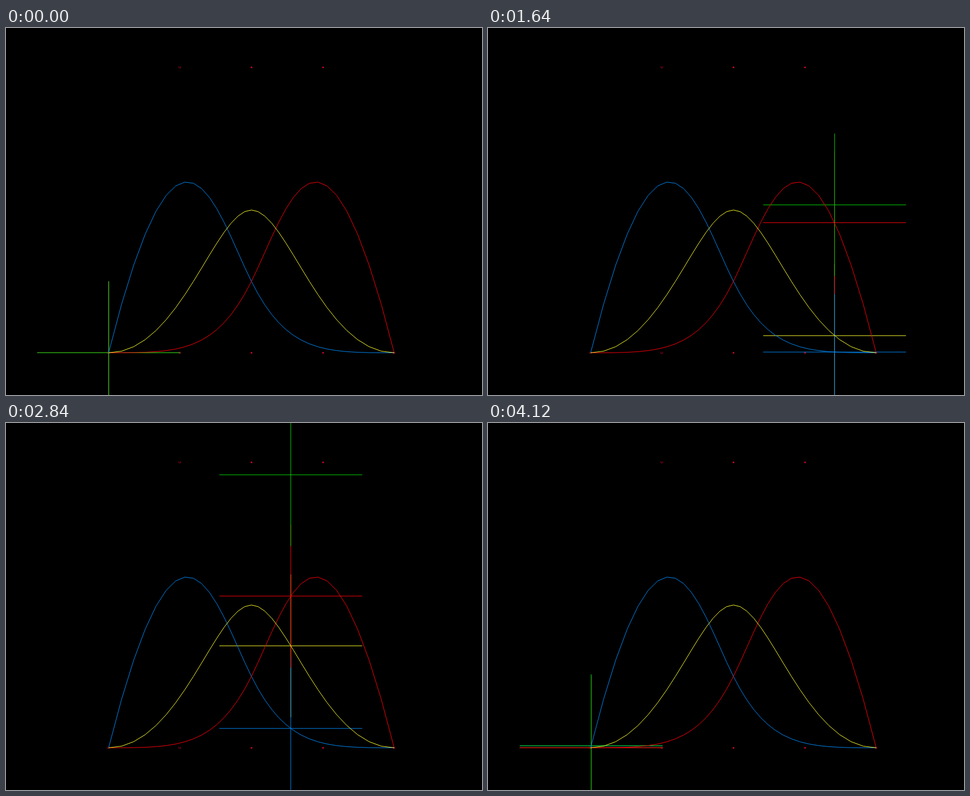
Animation, 852 px wide and 657 px high, one loop 4.16 s. Source, as an HTML page with a canvas:

```html
<!DOCTYPE html>
<html>
<head>
<meta charset="utf-8">
<title>Cubic B-spline basis functions</title>
<style>
  html, body { margin: 0; width: 100%; height: 100%; overflow: hidden; background: #000; }
  canvas { display: block; }
</style>
</head>
<body>
<canvas id="stage" width="852" height="657"></canvas>
<script>
const ctx = document.getElementById('stage').getContext('2d');
const LOOP = 4160, UNIT = 127.78, X0 = 183.7, Y0 = 581.4;
const YELLOW = '#f5f52a', BLUE = '#0086f0', RED = '#f8000c', GREEN = '#00d200';
const px = x => X0 + x * UNIT;
const py = y => Y0 - y * UNIT;

// Clamped cubic spline with knots 0,0,0,0,1,2,2,2,2 and control heights of 4.
const early = u => ((7 * u - 18) * u + 12) * u;
const late = u => u ** 3;
const xAt = t => t > 1 ? 4 - xAt(2 - t) : ((0.5 * t - 1.5) * t + 3) * t;
const blueAt = t => t > 1 ? late(2 - t) : early(t);
const redAt = t => blueAt(2 - t);
const yellowAt = t => {
  const u = Math.min(t, 2 - t);
  return (6 - 4 * u) * u * u;
};
const sumAt = t => blueAt(t) + redAt(t) + yellowAt(t);

function stroke(color, draw) {
  ctx.strokeStyle = color;
  ctx.beginPath();
  draw();
  ctx.stroke();
}

function curve(color, f) {
  stroke(color, () => {
    for (let i = 0; i <= 32; i++) ctx.lineTo(px(xAt(i / 16)), py(f(i / 16)));
  });
}

function cross(color, f, t) {
  const x = px(xAt(t)), y = py(f(t));
  stroke(color, () => {
    ctx.moveTo(x - UNIT, y);
    ctx.lineTo(x + UNIT, y);
    ctx.moveTo(x, y - UNIT);
    ctx.lineTo(x, y + UNIT);
  });
}

function marker(col, row) {
  const x = Math.floor(px(col)), y = Math.floor(py(row));
  if (col > 1) {
    ctx.fillStyle = '#80001a';
    ctx.fillRect(x - 1, y - 1, 3, 3);
    ctx.fillStyle = '#c80028';
    ctx.fillRect(x - 1, y, 3, 1);
    ctx.fillRect(x, y - 1, 1, 3);
  } else {
    stroke('#90001c', () => {
      ctx.moveTo(x - 1.5, y - 1.5);
      ctx.lineTo(x - 1.5, y + 1.5);
      ctx.lineTo(x + 1.5, y + 1.5);
      ctx.lineTo(x + 1.5, y - 1.5);
    });
  }
}

// 24 fps motion shown on a 25 fps clock: out over 49 frames, back over 50.
function paramAt(ms) {
  const frame = Math.floor(Math.floor(ms / 40) * 24 / 25);
  const s = frame < 49 ? frame / 49 : (99 - frame) / 50;
  return 2 * s * s * (3 - 2 * s);
}

function draw() {
  const t = paramAt(performance.now() % LOOP);
  ctx.fillStyle = '#000';
  ctx.fillRect(0, 0, 852, 657);
  ctx.lineWidth = 1;
  for (let i = 0; i < 5; i++) marker(i, 0);
  for (let i = 1; i < 4; i++) marker(i, 4);
  cross(YELLOW, yellowAt, t);
  cross(BLUE, blueAt, t);
  cross(RED, redAt, t);
  cross(GREEN, sumAt, t);
  curve(BLUE, blueAt);
  curve(RED, redAt);
  curve(YELLOW, yellowAt);
  requestAnimationFrame(draw);
}
draw();
</script>
</body>
</html>
```
